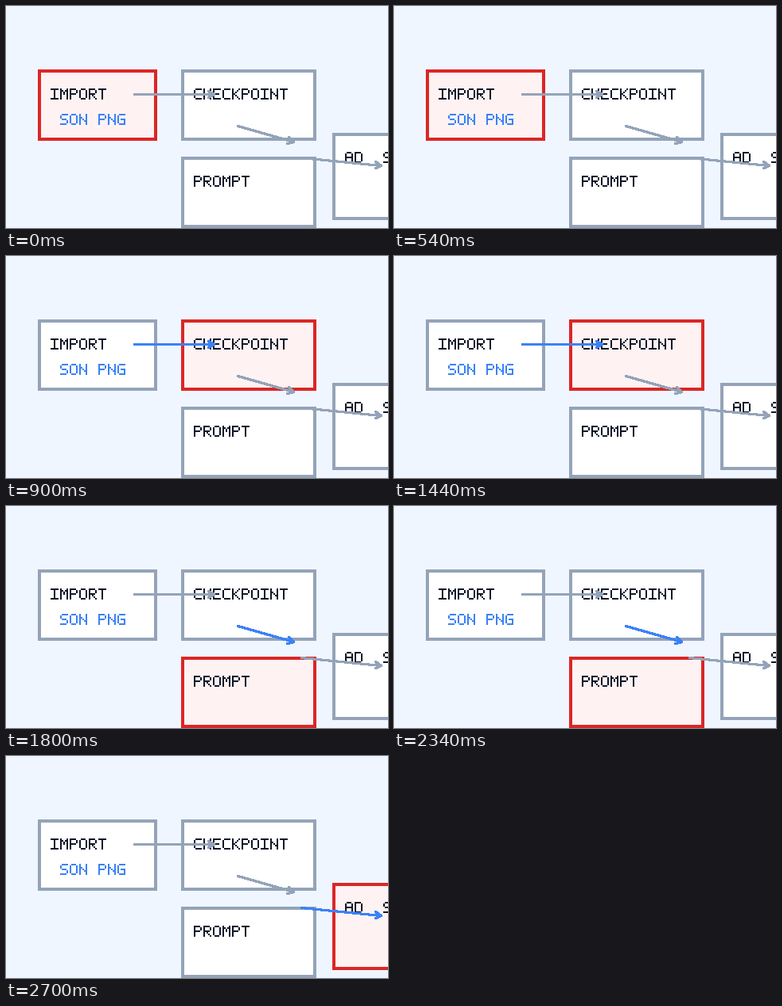
An HTML page for the animation above (3600 ms loop, 480x280 px).

```html
<!DOCTYPE html>
<html lang="en">
<head>
<meta charset="utf-8">
<title>Workflow steps</title>
<style>
  html, body { margin: 0; width: 100%; height: 100%; overflow: hidden; background: #eff6ff; }
  svg { display: block; width: 480px; height: 280px; shape-rendering: crispEdges; }
  .box { fill: #fff; stroke: #94a3b8; stroke-width: 4; animation: box 3.6s step-end infinite; }
  .arrow { fill: #94a3b8; animation: arrow 3.6s step-end infinite; }
  .text { fill: none; stroke-width: 1; stroke-linecap: square; }
  @keyframes box {
    0% { fill: #fef2f2; stroke: #dc2626; }
    25%, 100% { fill: #fff; stroke: #94a3b8; }
  }
  @keyframes arrow {
    0% { fill: #3b82f6; }
    25%, 100% { fill: #94a3b8; }
  }
</style>
</head>
<body>
<svg viewBox="0 0 480 280"></svg>
<script>
  const STEP = 0.9, LOOP = 3.6;
  const svg = document.querySelector('svg');

  // Pen strokes of a 5 by 7 letter grid
  const GLYPHS = {
    A: 'M1 0h2M0 1v5M4 1v5M1 3h2',
    C: 'M1 0h3M0 1v4M1 6h3',
    D: 'M0 0v6M1 0h2M4 1v4M1 6h2',
    E: 'M0 0v6M1 0h3M1 3h2M1 6h3',
    G: 'M1 0h3M0 1v4M2 3h2v3h-3',
    H: 'M0 0v6M4 0v6M1 3h2',
    I: 'M0 0h4M2 0v6M0 6h4',
    K: 'M0 0v6M4 0h0M3 1h0M2 2h0M1 3h0M2 4h0M3 5h0M4 6h0',
    M: 'M0 0v6M4 0v6M1 1h0M3 1h0M2 2v1',
    N: 'M0 0v6M4 0v6M1 2h0M2 3h0M3 4h0',
    O: 'M1 0h2M0 1v4M4 1v4M1 6h2',
    P: 'M0 0v6M1 0h2M4 1v1M1 3h2',
    R: 'M0 0v6M1 0h2M4 1v1M1 3h2M2 4h0M3 5h0M4 6h0',
    S: 'M1 0h3M0 1v1M1 3h2M4 4v1M0 6h3',
    T: 'M0 0h4M2 0v6'
  };

  function add(tag, attrs, parent = svg) {
    const el = document.createElementNS('http://www.w3.org/2000/svg', tag);
    for (const key in attrs) el.setAttribute(key, attrs[key]);
    return parent.appendChild(el);
  }

  const startAt = step => `animation-delay:${step * STEP - LOOP}s`;

  function write(text, x, y, color) {
    const line = add('g', {
      class: 'text', stroke: color, role: 'img', 'aria-label': text.trim(),
      transform: `translate(${x + 1} ${y + 1}) scale(2)`
    });
    [...text].forEach((ch, i) => {
      if (GLYPHS[ch]) add('path', { d: GLYPHS[ch], transform: `translate(${i * 6})` }, line);
    });
  }

  function box(step, x, y, w, title, note) {
    const h = step === 3 ? 110 : 90;
    add('rect', { class: 'box', style: startAt(step), x: x + 2, y: y + 2, width: w - 4, height: h - 4 });
    write(title, x + 16, y + 24, '#0f172a');
    if (note) write(note, x + 16, y + 56, '#3b82f6');
  }

  // Line made with a square 3 px pen
  function penLine(x0, y0, x1, y1) {
    const n = Math.max(Math.abs(x1 - x0), Math.abs(y1 - y0));
    let d = '';
    for (let i = 0; i <= n; i++) {
      const x = Math.round(x0 + (x1 - x0) * i / n);
      const y = Math.round(y0 + (y1 - y0) * i / n);
      d += `M${x} ${y}h3v3h-3z`;
    }
    return d;
  }

  function arrow(step, x0, y0, x1, y1) {
    const dir = Math.atan2(y1 - y0, x1 - x0);
    let d = penLine(x0, y0, x1, y1);
    for (const turn of [-0.5, 0.5]) {
      d += penLine(x1, y1,
        Math.round(x1 - 8 * Math.cos(dir + turn)),
        Math.round(y1 - 8 * Math.sin(dir + turn)));
    }
    add('path', { class: 'arrow', style: startAt(step), d });
  }

  box(0, 40, 80, 150, 'IMPORT', ' SON PNG');
  box(1, 220, 80, 170, 'CHECKPOINT');
  box(2, 220, 190, 170, 'PROMPT');
  box(3, 410, 160, 170, 'AD  S');

  arrow(1, 160, 110, 260, 110);
  arrow(2, 290, 150, 360, 170);
  arrow(3, 370, 190, 470, 200);
</script>
</body>
</html>
```
